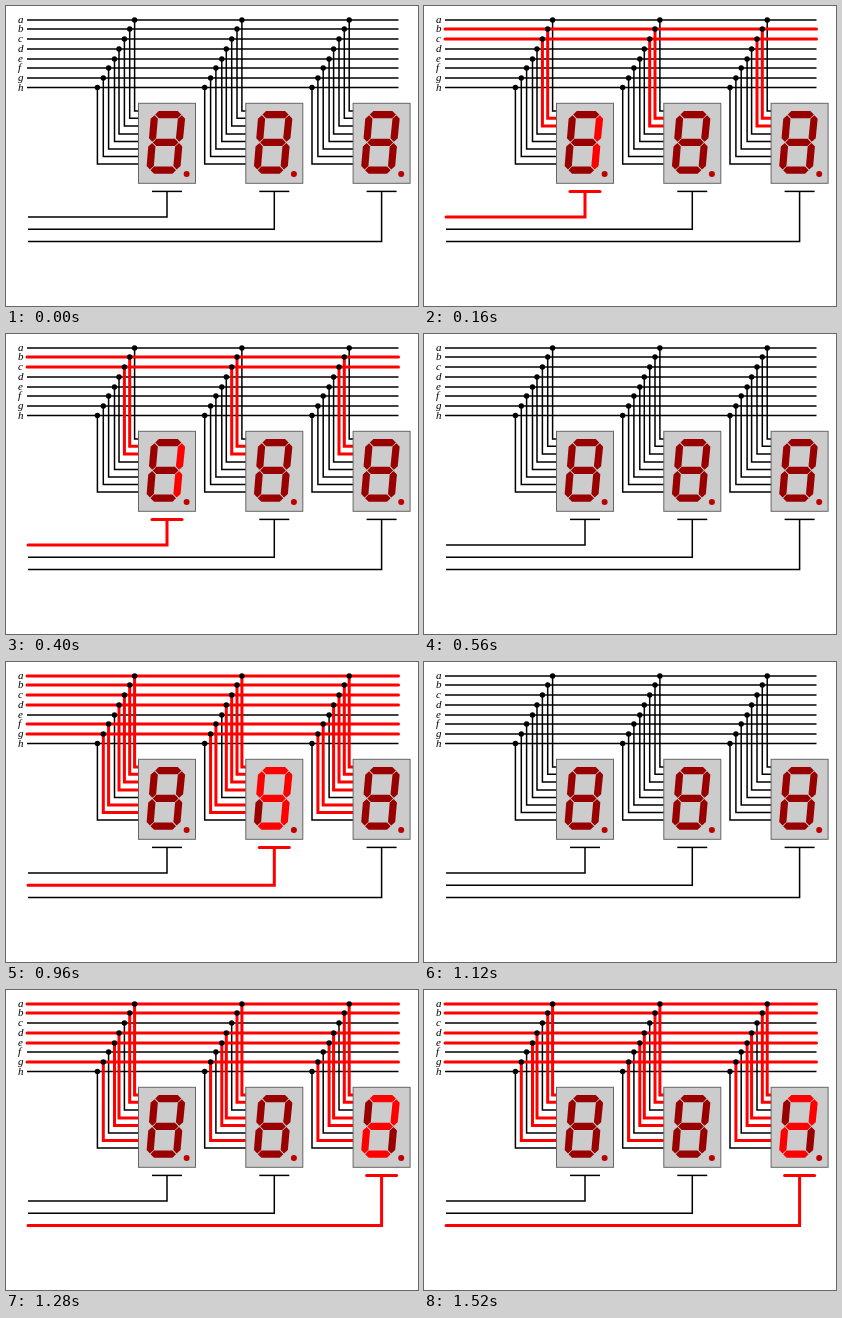
An HTML page that plays this animation: 412 by 300 pixels, repeating every 1.68 s.

```html
<!DOCTYPE html>
<html lang="en">
<head>
<meta charset="utf-8">
<title>Multiplexed seven-segment display</title>
<style>
  html, body { margin: 0; width: 100%; height: 100%; overflow: hidden; background: #fff; }
  svg { display: block; width: 412px; height: 300px; }
  text { font: italic 11px "Liberation Serif", "Noto Serif", serif; }
  .wire { fill: none; stroke: #000; stroke-width: 1.5; }
  .hot { fill: none; stroke: #f00; stroke-width: 3; stroke-linecap: round; visibility: hidden; }
  .case { fill: #ccc; stroke: #666; }
  .seg { fill: #900; }
  .point { fill: #b00; }
  .hot.on { visibility: visible; }
  .seg.on { fill: #f00; }
</style>
</head>
<body>
<svg viewBox="0 0 412 300"></svg>
<script>
(() => {
  const svg = document.querySelector('svg');
  const labels = 'abcdefgh';
  const busY = [14, 23, 33, 43, 53, 62, 72, 81.5];
  const tapX = [128.6, 123.7, 118.4, 113, 108.5, 102.6, 97.3, 91.4];
  const pinY = [105, 112.3, 120, 128, 135.4, 143, 150.6, 158];
  const pitch = 107.3;

  // Segment corners of the first digit, then the corner pair of each segment
  const nodes = {
    tl: [148.6, 108.6], tr: [175.9, 108.6],
    ml: [146.2, 136.4], mr: [173.1, 136.4],
    bl: [143.9, 164.2], br: [170.6, 164.2]
  };
  const ends = {
    a: 'tl tr', b: 'tr mr', c: 'mr br', d: 'bl br', e: 'ml bl', f: 'tl ml', g: 'ml mr'
  };

  // Start time, active digit, energised segments
  const loop = 1680;
  const steps = [
    [0, -1, ''], [160, 0, 'bc'],
    [560, -1, ''], [720, 1, 'abcdfg'],
    [1120, -1, ''], [1280, 2, 'abdeg']
  ];

  function add(group, tag, attrs = {}) {
    const el = document.createElementNS('http://www.w3.org/2000/svg', tag);
    for (const key in attrs) el.setAttribute(key, attrs[key]);
    group.appendChild(el);
    return el;
  }

  const coldLayer = add(svg, 'g');
  const hotLayer = add(svg, 'g');
  const frontLayer = add(svg, 'g');
  const parts = [];

  function wire(d, lit) {
    add(coldLayer, 'path', { class: 'wire', d });
    parts.push({ el: add(hotLayer, 'path', { class: 'hot', d }), lit });
  }

  function segmentPoints(label) {
    const [p, q] = ends[label].split(' ').map(key => nodes[key]);
    const flat = p[1] === q[1];
    const half = 3.6, gap = 0.6;
    const len = Math.hypot(q[0] - p[0], q[1] - p[1]);
    const at = (dist, side) => {
      const k = dist / len;
      const x = p[0] + (q[0] - p[0]) * k + (flat ? 0 : side);
      const y = p[1] + (q[1] - p[1]) * k + (flat ? side : 0);
      return x.toFixed(2) + ',' + y.toFixed(2);
    };
    const inner = gap + half;
    return [
      at(gap, 0), at(inner, -half), at(len - inner, -half),
      at(len - gap, 0), at(len - inner, half), at(inner, half)
    ].join(' ');
  }

  [...labels].forEach((label, i) => {
    const y = busY[i];
    const lit = (digit, on) => on.includes(label);
    add(frontLayer, 'text', { x: 12, y: y + 3 }).textContent = label;
    wire(`M21 ${y}H392.5`, lit);
    for (let n = 0; n < 3; n++) {
      const shift = n * pitch, x = tapX[i] + shift;
      wire(`M${x} ${y}V${pinY[i]}H${133 + shift}`, lit);
      add(frontLayer, 'circle', { cx: x, cy: y, r: 2.7 });
    }
  });

  for (let n = 0; n < 3; n++) {
    const shift = n * pitch;
    const x = 161 + shift, y = 211 + n * 12.2;
    const active = digit => digit === n;
    wire(`M${x - 15} 185.4H${x + 15}`, active);
    wire(`M${x} 185.4V${y}H22`, active);

    const digit = add(frontLayer, 'g', { transform: `translate(${shift} 0)` });
    add(digit, 'rect', { class: 'case', x: 132.5, y: 97.3, width: 57, height: 80 });
    for (const label in ends) {
      const el = add(digit, 'polygon', { class: 'seg', points: segmentPoints(label) });
      parts.push({ el, lit: (d, on) => d === n && on.includes(label) });
    }
    add(digit, 'circle', { class: 'point', cx: 180.6, cy: 168, r: 3 });
  }

  function draw() {
    const t = performance.now() % loop;
    const [, digit, on] = steps.filter(step => step[0] <= t).pop();
    for (const { el, lit } of parts) el.classList.toggle('on', lit(digit, on));
    requestAnimationFrame(draw);
  }
  draw();
})();
</script>
</body>
</html>
```
